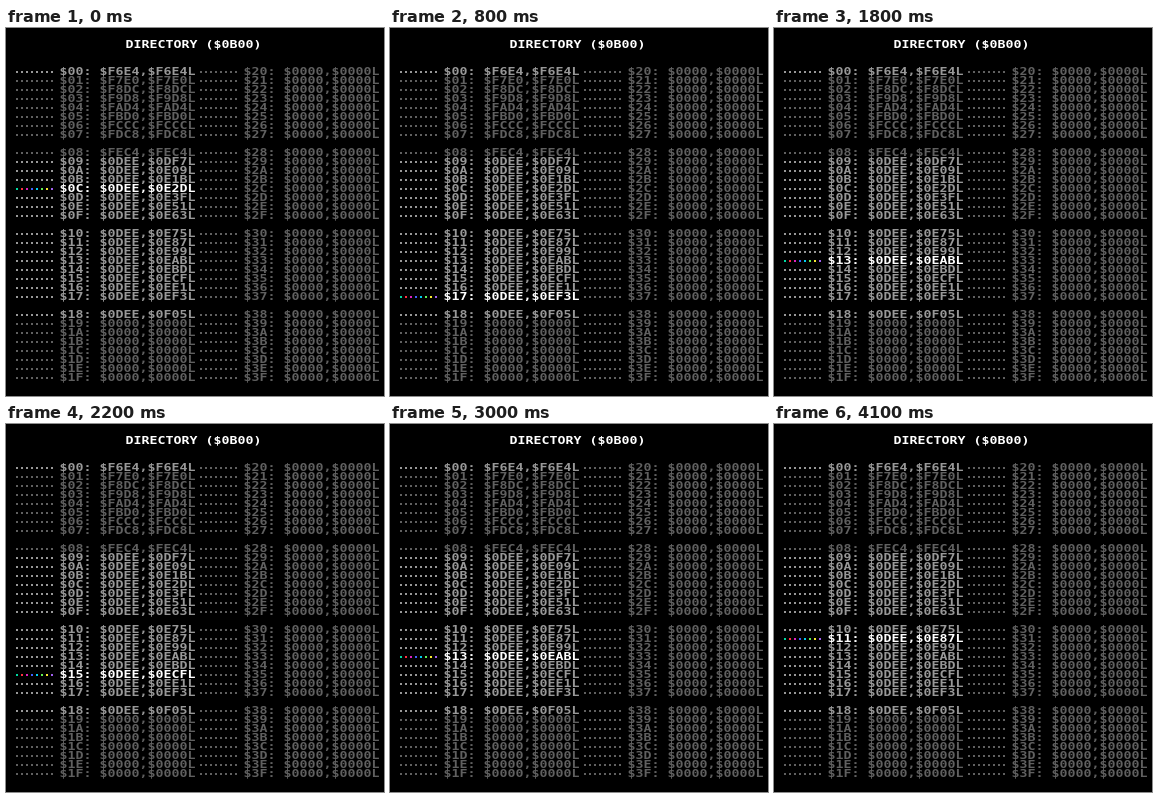
Recreate the animation shown at these times as an HTML page. Size 378 by 368 pixels, loop 4.2 s.

```html
<!DOCTYPE html>
<html lang="en">
<head>
<meta charset="utf-8">
<title>Directory</title>
<style>
html, body { margin: 0; width: 100%; height: 100%; overflow: hidden; background: #000; }
svg { display: block; width: 378px; height: 368px; }
text { font: bold 9.6px "DejaVu Sans Mono", monospace; text-anchor: middle; white-space: pre; }
rect { shape-rendering: crispEdges; }
.dim { fill: #606060; }
.used { fill: #989898; }
.lit { fill: #fff; }
.lit rect { fill: var(--voice); }
</style>
</head>
<body>
<svg id="stage" viewBox="0 0 378 368"></svg>
<script>
const stage = document.getElementById('stage');
const CELL = 8, LINE = 9, WIDEN = 1.38;
const FIRST = 0x09, LAST = 0x18;
const VOICES = ['#00d8a0', '#ff3040', '#e020c0', '#4060ff', '#00d0f0', '#60f050', '#f8e830', '#a060f0'];

function add(parent, tag, attrs) {
  const node = document.createElementNS('http://www.w3.org/2000/svg', tag);
  for (const key in attrs) node.setAttribute(key, attrs[key]);
  return parent.appendChild(node);
}

// Every character is centred in its own fixed cell.
function print(parent, string, left, top) {
  const centres = [...string].map((_, i) => ((left + 3.5 + i * CELL) / WIDEN).toFixed(2));
  add(parent, 'text', {
    x: centres.join(' '), y: top + 7, transform: `scale(${WIDEN} 1)`
  }).textContent = string;
}

const hex = (n, digits) => '$' + n.toString(16).toUpperCase().padStart(digits, '0');
const isSweep = i => i >= FIRST && i <= LAST;
const isUsed = i => i === 0 || isSweep(i);

function addresses(i) {
  if (i < FIRST) return [0xF6E4 + i * 0xFC, 0xF6E4 + i * 0xFC];
  if (isSweep(i)) return [0x0DEE, 0x0DF7 + (i - FIRST) * 0x12];
  return [0, 0];
}

function addEntry(i) {
  const left = i < 32 ? 0 : 184;
  const line = i % 32;
  const top = 40 + (line + Math.floor(line / 8)) * LINE;
  const group = add(stage, 'g', { class: isUsed(i) ? 'used' : 'dim' });
  VOICES.forEach((colour, v) => add(group, 'rect', {
    x: left + 10 + v * 5, y: top + 3, width: 2, height: 2, style: `--voice: ${colour}`
  }));
  const [start, loop] = addresses(i);
  print(group, hex(i, 2) + ':', left + 54, top);
  print(group, `${hex(start, 4)},${hex(loop, 4)}L`, left + 94, top);
  return group;
}

print(add(stage, 'g', { class: 'lit' }), 'DIRECTORY ($0B00)', 120, 13);
const entries = Array.from({ length: 64 }, (_, i) => addEntry(i));

// A free sweep first, then a ping-pong sweep restarted every 12 ticks.
const OPENING = [12, 12, 13, 14, 16, 17, 19, 20, 23, 24, 22, 20, 18];

function activeEntry(tick) {
  if (tick < OPENING.length) return OPENING[tick];
  const travel = (tick - OPENING.length) % 12 * 2;
  return FIRST + Math.min(travel, 30 - travel);
}

const began = performance.now();
let current = -1;

function draw() {
  const tick = Math.floor((performance.now() - began) % 4200 / 100);
  const next = activeEntry(tick);
  if (next !== current) {
    if (current >= 0) entries[current].setAttribute('class', 'used');
    entries[next].setAttribute('class', 'lit');
    current = next;
  }
  requestAnimationFrame(draw);
}
draw();
</script>
</body>
</html>
```
